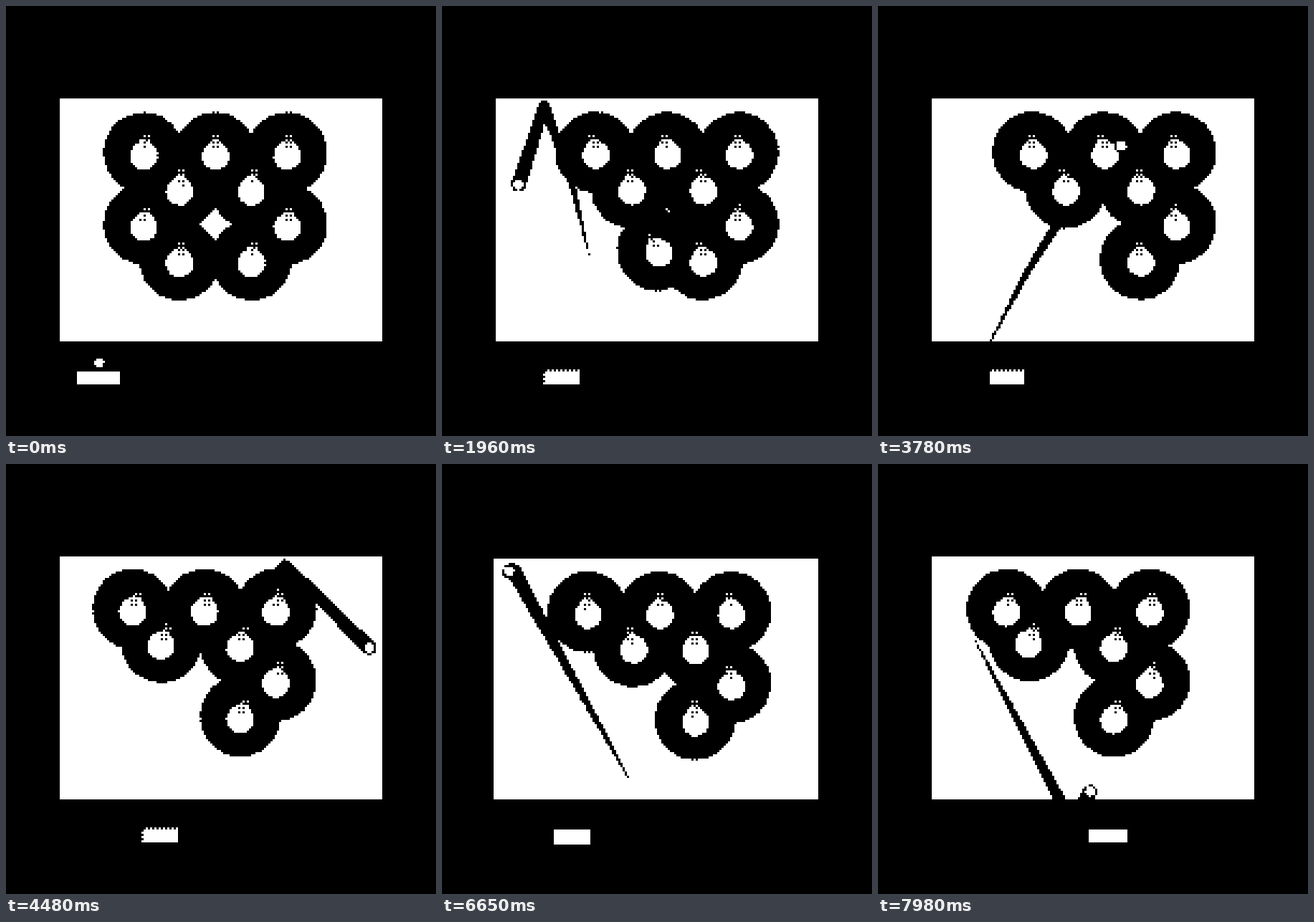
Write an HTML page with a canvas that moves like this. It is 600 px wide and 600 px high and loops after 8000 ms.

```html
<!DOCTYPE html>
<html lang="en">
<head>
<meta charset="utf-8">
<title>Swinging bulbs</title>
<style>
  html, body { margin: 0; width: 100%; height: 100%; overflow: hidden; background: #000; }
  canvas { display: block; width: 100vmin; height: 100vmin; image-rendering: pixelated; }
</style>
</head>
<body>
<canvas id="stage" width="200" height="200"></canvas>
<script>
const ctx = document.getElementById('stage').getContext('2d', { willReadFrequently: true });
const LOOP = 8000, STEP = 70, ARM = 100, SPEED = 347, LAUNCH = .493;
const BLACK = '#000', WHITE = '#fff', DIM = '#6d6d6d', PALE = '#929292';

// The ball runs between its bounces at constant speed
const bounces = [
  [130, 498], [209, 363], [183, 255], [143, 138], [84, 320], [139, 502], [210, 368], [262, 285],
  [389, 138], [521, 271], [298, 502], [101, 147], [84, 150], [272, 502], [316, 420]
];
let clock = LAUNCH;
const ballKeys = bounces.map(([x, y], i) => {
  if (i) clock += Math.hypot(x - bounces[i - 1][0], y - bounces[i - 1][1]) / SPEED;
  return [clock, x, y];
});
const paddleHits = ballKeys.filter(([, , y]) => y > 490).map(k => k[0]);
const wallHits = ballKeys.filter(([, x, y]) => x < 90 || x > 510 || y < 150).map(k => k[0]);

const paddleKeys = [
  [.1, 130], [.84, 167.5], [1.96, 167.5], [2.72, 141], [3.15, 148],
  [4.48, 215.5], [5.46, 320.5], [6.65, 182.5], [7.75, 288], [7.98, 322]
];

// Staggered rows of bulbs; hit and gone name the bounce that strikes or breaks one
const special = {
  '1,0': { hit: 7, lead: 7, amp: 42 },
  '2,0': { gone: 1 },
  '2,1': { gone: 0, missing: true },
  '3,0': { hit: 1, lead: -53, amp: 52, gone: 6 }
};
const bulbs = [];
for (let row = 0; row < 4; row++) {
  for (let col = 0; col < 3 - row % 2; col++) {
    const bulb = { x: 200 + 100 * col + 50 * (row % 2), y: 205 + 50 * row, ...special[row + ',' + col] };
    if (!bulb.missing) bulbs.push(bulb);
  }
}

function at(keys, t) {
  const i = keys.findIndex(k => k[0] > t);
  if (i === 0) return keys[0].slice(1);
  if (i < 0) return keys[keys.length - 1].slice(1);
  const a = keys[i - 1], b = keys[i], f = (t - a[0]) / (b[0] - a[0]);
  return a.slice(1).map((v, n) => v + (b[n + 1] - v) * f);
}

function sinceLast(hits, t) {
  const past = hits.filter(h => h <= t);
  return past.length ? t - past[past.length - 1] : Infinity;
}

function disc(x, y, r, color) {
  ctx.fillStyle = color;
  ctx.beginPath();
  ctx.arc(x, y, r, 0, Math.PI * 2);
  ctx.fill();
}

function rect(x, y, w, h, color) {
  ctx.fillStyle = color;
  ctx.fillRect(x, y, w, h);
}

const sinDeg = a => Math.sin(a * Math.PI / 180);

// Steady swing with a slow start; a struck bulb eases into a wider one
function swing(bulb, t) {
  const steady = 201.5 * t - 961;
  const drift = 80 * Math.exp(-1.2 * t) - 28 * Math.sin(Math.PI * t / 7.1);
  const shared = 22.5 * sinDeg(steady + drift);
  if (!bulb.hit) return shared;
  const mix = Math.min(1, Math.max(0, (t - ballKeys[bulb.hit][0]) / .6));
  return shared + (bulb.amp * sinDeg(steady + bulb.lead) - shared) * mix;
}

// Runs paint with the origin at the pivot and the arm pointing down
function onArm(bulb, t, paint) {
  ctx.save();
  ctx.translate(bulb.x, bulb.y - ARM);
  ctx.rotate(-Math.asin(swing(bulb, t) / ARM));
  paint();
  ctx.restore();
}

function paintHalo() {
  disc(-.5, ARM, 56.2, BLACK);
}

function paintBulb() {
  disc(0, ARM + 4.5, 19.2, WHITE);
  ctx.beginPath();
  ctx.moveTo(-5, 82);
  ctx.lineTo(5, 82);
  ctx.lineTo(16, 95);
  ctx.lineTo(-16, 95);
  ctx.fill();
  rect(-7, 72, 14, 11, DIM);
  rect(-7, 83, 14, 14, PALE);
}

function paintTrail(t) {
  for (let age = 1; age > 0; age -= .008) {
    const [x, y] = at(ballKeys, t - age);
    disc(x, y, 1.2 + 8.6 * (1 - age), BLACK);
  }
}

function paintBall(t) {
  const [x, y] = at(ballKeys, t);
  disc(x, y, 9.5, BLACK);
  disc(x, y, 7, WHITE);
}

function paintPaddle(t) {
  const age = t < LAUNCH ? 0 : sinceLast(paddleHits, t);
  const squash = Math.exp(-6 * age);
  const w = 50 + 10 * squash, h = 20 - 1.5 * squash;
  rect(at(paddleKeys, t)[0] - w / 2, 528.5 - h, w, h, WHITE);
}

// Reduces the grey picture to one bit with a 2 by 2 ordered threshold
function dither() {
  const image = ctx.getImageData(0, 0, 200, 200), d = image.data;
  const limits = [.4, .53, .6, .47];
  for (let i = 0; i < d.length; i += 4) {
    const x = i / 4 % 200, y = Math.floor(i / 800);
    const limit = limits[(y % 2) * 2 + x % 2] * 255;
    d[i] = d[i + 1] = d[i + 2] = d[i] > limit ? 255 : 0;
  }
  ctx.putImageData(image, 0, 0);
}

function render(t) {
  ctx.setTransform(1 / 3, 0, 0, 1 / 3, 0, 0);
  rect(0, 0, 600, 600, BLACK);

  const age = sinceLast(wallHits, t);
  const shake = age < 1 ? 1.8 * Math.cos(25 * age) * Math.exp(-10 * age) : 0;
  ctx.translate(-shake, shake);

  rect(74.2, 129.8, 451.2, 337.7, WHITE);
  const alive = bulbs.filter(b => b.gone === undefined || t < ballKeys[b.gone][0]);
  alive.forEach(b => onArm(b, t, paintHalo));
  paintTrail(t);
  alive.forEach(b => onArm(b, t, paintBulb));
  paintBall(t);
  paintPaddle(t);
  dither();
}

const start = performance.now();
function frame() {
  const ms = (performance.now() - start) % LOOP;
  render(Math.floor(ms / STEP) * STEP / 1000);
  requestAnimationFrame(frame);
}
frame();
</script>
</body>
</html>
```
